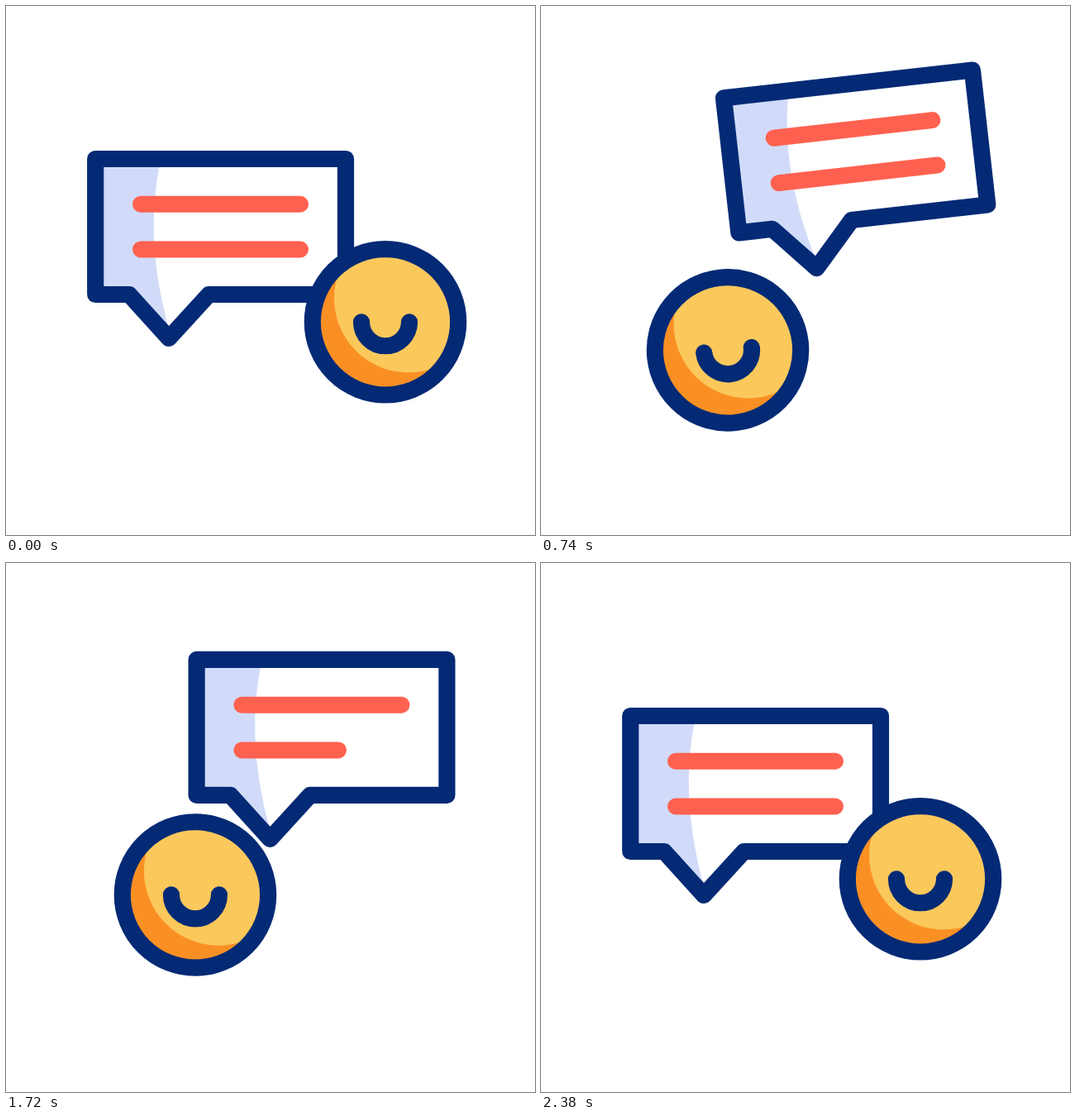
Animation, 640 px wide and 640 px high, one loop 2400 ms. Source, as an HTML page:

```html
<!DOCTYPE html>
<html lang="en">
<head>
<meta charset="utf-8">
<title>Chat bubble and smiley</title>
<style>
  html, body { margin: 0; width: 100%; height: 100%; overflow: hidden; background: #fff; }
  svg { display: block; width: 100%; height: 100%; }
  .ink { fill: none; stroke: #042a75; stroke-width: 20.2; }
  .text { stroke: #ff6150; stroke-width: 20; }
  .spark { stroke: #ffcb50; stroke-width: 20.5; }
  path, line { stroke-linecap: round; stroke-linejoin: round; }
</style>
</head>
<body>
<svg viewBox="0 0 640 640">
  <defs>
    <clipPath id="disc"><circle cx="459" cy="382.3" r="88"/></clipPath>
  </defs>
  <g id="bubble">
    <path fill="#fff" d="M108.2 185H411V349H245.5L197 402L149 349H108.2Z"/>
    <path fill="#d1dbf9" d="M108.2 185H187.5C176 235 172.500 305 198 394L197 402L149 349H108.2Z"/>
    <path class="ink" d="M108.2 185H411V349H245.5L197 402L149 349H108.2Z"/>
    <line class="text" id="row1" x1="163" y1="239.8" x2="356" y2="239.8"/>
    <line class="text" id="row2" x1="163" y1="294.5" x2="356" y2="294.5"/>
  </g>
  <g id="face">
    <circle cx="459" cy="382.3" r="88" fill="#fa9024"/>
    <circle cx="487" cy="353.500" r="90" fill="#fbc85c" clip-path="url(#disc)"/>
    <circle class="ink" cx="459" cy="382.3" r="88.2"/>
    <path class="ink" d="M430 382.3A29 29 0 0 0 488 382.3"/>
  </g>
  <g id="sparks"></g>
</svg>
<script>
const STEP = 20, COUNT = 120;
const get = id => document.getElementById(id);
const bubble = get('bubble'), face = get('face');

const smooth = u => {
  u = Math.min(1, Math.max(0, u));
  return u * u * (3 - 2 * u);
};

// Eased value from a list of [tick, value] keys
function track(keys, t) {
  if (t <= keys[0][0]) return keys[0][1];
  for (let i = 1; i < keys.length; i++) {
    const [a, from] = keys[i - 1], [b, to] = keys[i];
    if (t <= b) return from + (to - from) * smooth((t - a) / (b - a));
  }
  return keys[keys.length - 1][1];
}

const travel = [[10, 0], [31, 1], [85, 1], [100, 0]];
const bob = [[10, 0], [28.75, 1], [47.5, 0], [66.25, 1], [85, 0]];
const tilt = [[30.5, 0], [41.4, -10], [52.3, 10], [63.2, -10], [74.1, 10], [85, 0]];
const row1 = [[40, 1], [60, 0.373], [80, 1]];
const row2 = [[60, 1], [80, 0.495], [100, 1]];
const sparkHead = [[95, 0], [110, 1]];
const sparkTail = [[100, 0], [115, 1]];

// Two pairs of sparks: start point and travel
const sparks = [
  [528, 272.5, 34, -45],
  [552, 296, 45, -34],
  [355.5, 458, -45, 34],
  [379, 482, -34, 45]
].map(([x, y, dx, dy]) => {
  const el = document.createElementNS('http://www.w3.org/2000/svg', 'line');
  el.setAttribute('class', 'spark');
  get('sparks').appendChild(el);
  return { el, x, y, dx, dy };
});

function place(el, dx, dy, angle, cx, cy) {
  el.setAttribute('transform', `translate(${dx} ${dy}) rotate(${angle} ${cx} ${cy})`);
}

function draw(t) {
  const p = track(travel, t), b = track(bob, t), a = track(tilt, t);
  const out = t < 40 ? 3 * p * (1 - p) : 0;
  place(bubble, 124 * p, -69 * p - 37.7 * b + 42 * out * p, a, 259.5, 293.5);
  place(face, -233 * p, 19.4 * p + 24.8 * b + 75 * out * (1 - p), a, 459, 382.3);

  get('row1').setAttribute('x2', 163 + 193 * track(row1, t));
  get('row2').setAttribute('x2', 163 + 193 * track(row2, t));

  const head = track(sparkHead, t), tail = track(sparkTail, t);
  get('sparks').setAttribute('visibility', head > tail ? 'visible' : 'hidden');
  for (const s of sparks) {
    s.el.setAttribute('x1', s.x + s.dx * tail);
    s.el.setAttribute('y1', s.y + s.dy * tail);
    s.el.setAttribute('x2', s.x + s.dx * head);
    s.el.setAttribute('y2', s.y + s.dy * head);
  }
}

let start;
function tick(now) {
  if (start === undefined) start = now;
  draw(Math.floor((now - start) / STEP + 0.001) % COUNT);
  requestAnimationFrame(tick);
}
draw(0);
requestAnimationFrame(tick);
</script>
</body>
</html>
```
